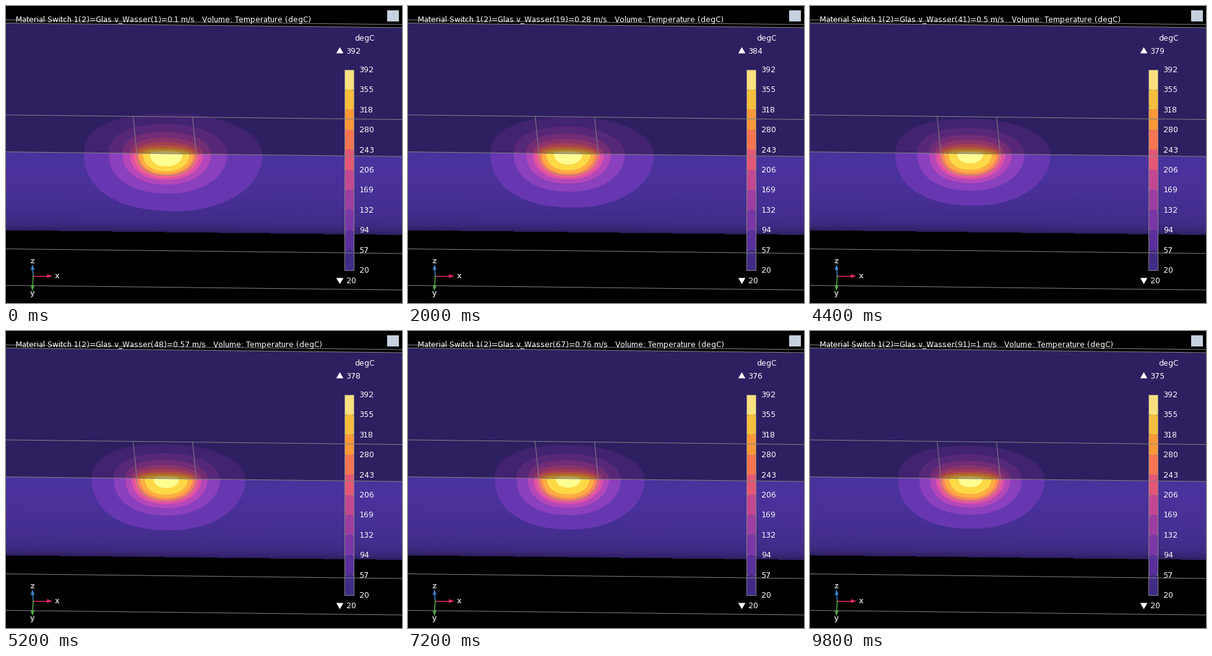
A matplotlib script for the animation above (10000 ms loop, 640 px wide and 480 px high).

```python
import numpy as np
import matplotlib.pyplot as plt
from matplotlib.animation import FuncAnimation
from matplotlib.colors import to_rgb
from matplotlib.patches import Polygon, Rectangle

# whole-pixel letter spacing
plt.rcParams.update({"font.family": "DejaVu Sans", "text.hinting_factor": 1})

W, H, DPI = 640, 480, 80
FRAMES, STEP_MS, RUNS = 50, 200, 91
T_MIN, T_MAX, BANDS = 20, 392, 10
PX = 72 / DPI
SLOPE = 7.5 / W
TOP, EDGE, SEAM, FLOOR = 27, 175.5, 235.2, 362
GREY = "#828282"

# one palette, lit differently on the bar, the front face and the glass
PALETTE = np.array([to_rgb(c) for c in (
    "#402b86", "#5a309c", "#7a38a6", "#9e3ea2", "#c24892",
    "#e25876", "#f57552", "#fb983a", "#f5be3e", "#f9e080")])
LIT = np.clip(PALETTE * 1.14, 0, 1)
DIM = PALETTE * 0.72

fig = plt.figure(figsize=(W / DPI, H / DPI), dpi=DPI, facecolor="black")
ax = fig.add_axes([0, 0, 1, 1])
ax.axis("off")


def seam(x):
    return SEAM + SLOPE * x


def backdrop():
    y, x = np.mgrid[0:H, 0:W]
    level = y - SLOPE * x
    d = np.clip((level - SEAM) / (FLOOR - SEAM), 0, 1)
    shade = 1.17 - 0.2 * d ** 2 - 0.28 * d ** 16
    light = np.where(level < SEAM, 0.73, shade)
    light[(level < TOP) | (level >= FLOOR)] = 0
    return light[..., None] * PALETTE[0]


def isotherm(k, heat):
    """Centre, half width, depth below and height above the seam."""
    outer, inner = 2.0 ** -k, 2.0 ** (k - 9)
    mid = 258.6 + (6 + 38 * heat) * outer ** 2
    half = 48 + (142 + 51 * heat) * outer - (29 - 7 * heat) * inner
    depth = 36 + (90 + 24 * heat) * outer - (22.6 - 7 * heat) * inner
    rise = (56 + 11.6 * heat) * 0.75 ** (k - 1) - 2.5
    return mid, half, depth, rise


def half_oval(mid, half, height, count):
    """Rounded half contour on the seam, fuller on its left side."""
    a = np.linspace(np.pi, 0, count)
    c, s = np.cos(a), np.abs(np.sin(a))
    p = 2 / np.where(c < 0, 2.3, 2.05)
    x = mid + half * np.sign(c) * np.abs(c) ** p
    return np.column_stack([x, seam(x) + height * s ** p])


def line(x, y, color=GREY, width=1.0):
    ax.plot(x, y, color=color, lw=width * PX)


def shape(points, color):
    return ax.add_patch(Polygon(points, fc=color, ec="none"))


def label(x, y, text, color="white", **kw):
    return ax.text(x, y, text, color=color, fontsize=12 * PX,
                   va="baseline", **kw)


def arrow(base, tip, color):
    base, tip = np.array(base, float), np.array(tip, float)
    d = (tip - base) / np.hypot(*(tip - base))
    side = 3.2 * np.array([-d[1], d[0]])
    neck = tip - 9 * d
    line(*zip(base, neck), color=color, width=1.6)
    shape([tip, neck + side, neck - side], color)


def marker(y, height):
    shape([(539, y), (544.8, y + height), (533.2, y + height)], "white")


ax.imshow(backdrop(), extent=(-0.5, W - 0.5, H - 0.5, -0.5),
          interpolation="nearest", aspect="auto")
ax.set_xlim(-0.5, W - 0.5)
ax.set_ylim(H - 0.5, -0.5)

blank = np.zeros((3, 2))
upper = [shape(blank, c) for c in DIM[1:]]
lower = [shape(blank, c) for c in LIT[1:]]

# model edges
for y0 in (22, TOP, EDGE, SEAM, 392, 451):
    line([0, W], [y0, y0 + SLOPE * W])
for x0 in (205, 301):
    line([x0, x0 + 6], [EDGE + SLOPE * x0, seam(x0 + 6)])
line(*half_oval(259, 48, 35.5, 60).T)

# colour bar
LEFT, RIGHT, HIGH, LOW = 546, 561, 102, 426
ticks = np.linspace(LOW, HIGH, BANDS + 1)
band = (LOW - HIGH) / BANDS
for y, color in zip(ticks, PALETTE):
    ax.add_patch(Rectangle((LEFT, y - band), RIGHT - LEFT, band,
                           fc=color, ec="none"))
for y, value in zip(ticks, np.linspace(T_MIN, T_MAX, BANDS + 1)):
    label(570.5, round(y) + 4.5, f"{value:.0f}")
    for x in (LEFT, RIGHT - 3):
        line([x, x + 3], [y, y], width=0.8)
ax.add_patch(Rectangle((LEFT, HIGH), RIGHT - LEFT, LOW - HIGH,
                       fc="none", ec=GREY, lw=PX))
label(562.5, 55.5, "degC")
marker(66, 10)
marker(449, -10)
label(549.5, 447.5, f"{T_MIN}")

# axis triad
for tip, color, name, spot in (((74.5, 436), "#dc2a5c", "x", (82, 439.5)),
                               ((42, 417), "#3f80c4", "z", (42, 415.5)),
                               ((42, 460), "#55aa4a", "y", (42, 467.5))):
    arrow((43.5, 436), tip, color)
    label(*spot, name, color="#b4b4b4", weight="bold", ha="center")

ax.add_patch(Rectangle((615, 6), 19, 18, fc="#c6d0de", ec="none"))

title = label(15.5, 25.5, "")
peak = label(549.5, 76.5, "")


def draw(i):
    run = 1 + i * (RUNS - 1) // (FRAMES - 1)
    speed = round(0.1 + 0.01 * (run - 1), 2)
    heat = abs(np.log10(speed)) ** 1.1
    for k in range(1, BANDS):
        mid, half, depth, rise = isotherm(k, heat)
        count = 21 - k
        upper[k - 1].set_xy(half_oval(mid, half, -rise, count))
        lower[k - 1].set_xy(half_oval(mid, half, depth, count))
    title.set_text(f"Material Switch 1(2)=Glas v_Wasser({run})={speed:g} m/s"
                   "   Volume: Temperature (degC)")
    peak.set_text(f"{374.6 + 17.8 * heat:.0f}")
    return [*upper, *lower, title, peak]


anim = FuncAnimation(fig, draw, frames=FRAMES, interval=STEP_MS,
                     repeat=True, blit=False)
plt.show()
```
